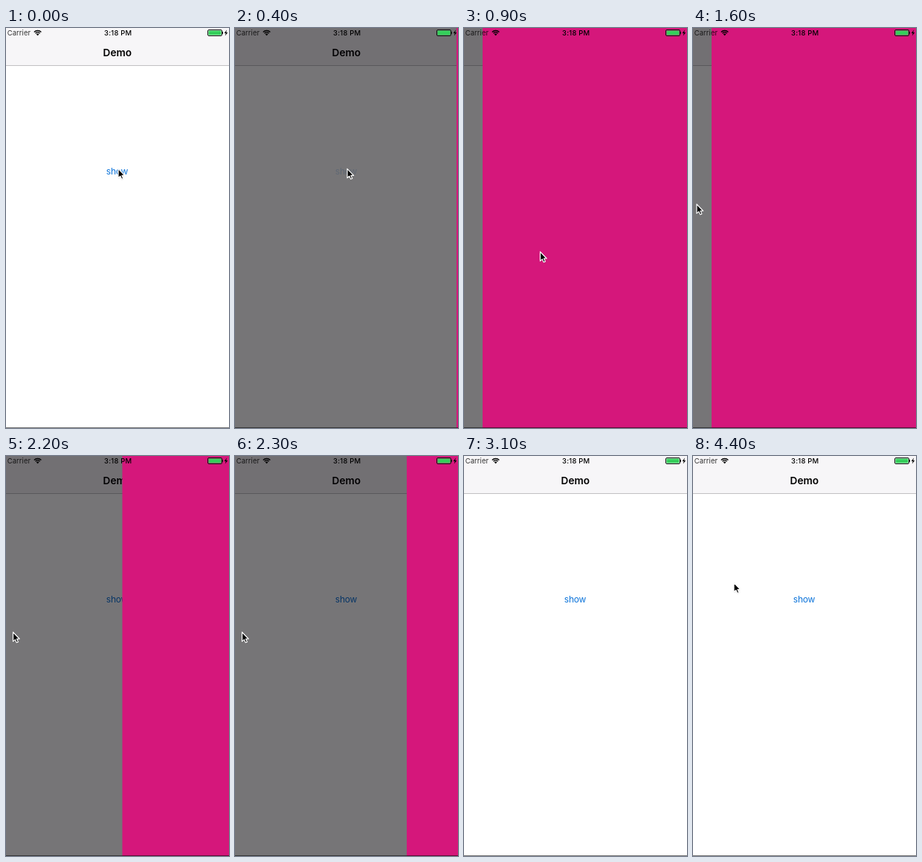
These frames come from a looping animation (300x538 px, 4.5 s). An HTML page with a canvas:

```html
<!DOCTYPE html>
<html lang="en">
<head>
<meta charset="utf-8">
<title>Side panel demo</title>
<style>
html, body { margin: 0; width: 100%; height: 100%; overflow: hidden; background: #fff; }
canvas { display: block; width: 300px; height: 538px; }
</style>
</head>
<body>
<canvas id="stage"></canvas>
<script>
const W = 300, H = 538, LOOP = 4500, STEP = 100;
const PANEL_W = 275, SLIDE = 500;
const SHOW_AT = 368, DIM_AT = 400, HIDE_AT = 1880, GONE_AT = 2400, BACK_AT = 4400;
const canvas = document.getElementById('stage');
const ctx = canvas.getContext('2d');
const ratio = window.devicePixelRatio || 1;
canvas.width = W * ratio;
canvas.height = H * ratio;

const clamp = v => Math.min(1, Math.max(0, v));
const span = (t, from, to) => clamp((t - from) / (to - from));
const smooth = p => p * p * (3 - 2 * p);

// cubic-bezier(.42, 0, 1, 1)
function easeIn(p) {
  let lo = 0, hi = 1;
  for (let i = 0; i < 24; i++) {
    const s = (lo + hi) / 2, r = 1 - s;
    if (1.26 * r * r * s + 3 * r * s * s + s * s * s < p) lo = s;
    else hi = s;
  }
  return smooth(lo);
}

const slide = (t, at) => easeIn(span(t, at, at + SLIDE));
const panelX = t => W - PANEL_W * (slide(t, SHOW_AT) - slide(t, HIDE_AT));

function pointerAt(t) {
  if (t >= BACK_AT) return { x: 55, y: 170.5 };
  if (t >= GONE_AT) return null;
  const drop = smooth(span(t, 500, 900));
  const away = smooth(span(t, 900, 1300));
  const nudge = span(t, 1500, 1900);
  return {
    x: 151 - 48.5 * drop - 99 * away + 6 * nudge,
    y: 189.3 + 111.7 * drop - 64 * away
  };
}

function box(x, y, w, h, color) {
  ctx.fillStyle = color;
  ctx.fillRect(x, y, w, h);
}

function label(str, x, y, weight, size, color, spacing = 0, align = 'center') {
  ctx.font = `${weight} ${size}px Inter, Roboto, sans-serif`;
  ctx.letterSpacing = spacing + 'px';
  ctx.textAlign = align;
  ctx.fillStyle = color;
  ctx.fillText(str, x, y);
}

function polygon(points) {
  ctx.beginPath();
  points.forEach(([x, y]) => ctx.lineTo(x, y));
  ctx.closePath();
  ctx.fillStyle = '#000';
  ctx.fill();
}

function drawPage(t) {
  box(0, 0, W, H, '#fff');
  box(0, 0, W, 50, '#f7f6f8');
  box(0, 50, W, 1, '#c1c0c2');
  label('Demo', 149.8, 37.5, 600, 13.6, '#000');
  ctx.globalAlpha = t < DIM_AT ? 1 : 0.2 + 0.8 * span(t, DIM_AT, 900);
  label('show', 149.5, 197, 400, 12, '#0d74da', -0.2);
  ctx.globalAlpha = 1;
}

function drawWifi() {
  const cx = 42.6, cy = 10.3, a = Math.PI / 4;
  const arc = r => ctx.arc(cx, cy, r, -3 * a, -a);
  ctx.strokeStyle = ctx.fillStyle = '#000';
  ctx.lineWidth = 1.3;
  for (const r of [4.3, 6.8]) {
    ctx.beginPath();
    arc(r);
    ctx.stroke();
  }
  ctx.beginPath();
  ctx.moveTo(cx, cy);
  arc(2.6);
  ctx.fill();
}

function drawStatus() {
  label('Carrier', 1.7, 10.2, 400, 9.4, 'rgba(0,0,0,.8)', 0.1, 'left');
  drawWifi();
  label('3:18 PM', 150.7, 10.2, 500, 9.4, '#000', 0.25);
  ctx.beginPath();
  ctx.roundRect(271.5, 2.5, 19, 8, 1.5);
  ctx.strokeStyle = '#111';
  ctx.lineWidth = 1;
  ctx.stroke();
  box(272.5, 3.5, 17, 6, '#35cf5b');
  box(291, 5, 1, 3, '#222');
  polygon([[297, 2.6], [293.7, 7.1], [295.7, 7.1], [294.8, 10.6], [298.3, 5.9], [296.2, 5.9]]);
}

function drawPointer({ x, y }) {
  ctx.save();
  ctx.translate(x, y);
  ctx.shadowColor = 'rgba(0,0,0,.35)';
  ctx.shadowBlur = 1.5 * ratio;
  ctx.shadowOffsetY = 0.6 * ratio;
  polygon([[0, 0], [0, 12.4], [2.8, 9.9], [4.7, 14], [6.8, 13.1], [5, 9.1], [8.7, 9]]);
  ctx.shadowColor = 'transparent';
  ctx.lineJoin = 'round';
  ctx.strokeStyle = '#fff';
  ctx.lineWidth = 1.2;
  ctx.stroke();
  ctx.restore();
}

function draw(t) {
  ctx.setTransform(ratio, 0, 0, ratio, 0, 0);
  drawPage(t);
  if (t >= DIM_AT && t < GONE_AT) {
    box(0, 0, W, H, 'rgba(3,0,5,.543)');
    const x = panelX(t);
    box(x, 0, W - x, H, '#d5177b');
  }
  box(0, H - 1, W, 1, 'rgba(0,0,0,.53)');
  drawStatus();
  const tip = pointerAt(t);
  if (tip) drawPointer(tip);
}

const start = performance.now();
function frame() {
  const t = (performance.now() - start) % LOOP;
  draw(Math.floor(t / STEP) * STEP);
  requestAnimationFrame(frame);
}
frame();
</script>
</body>
</html>
```
